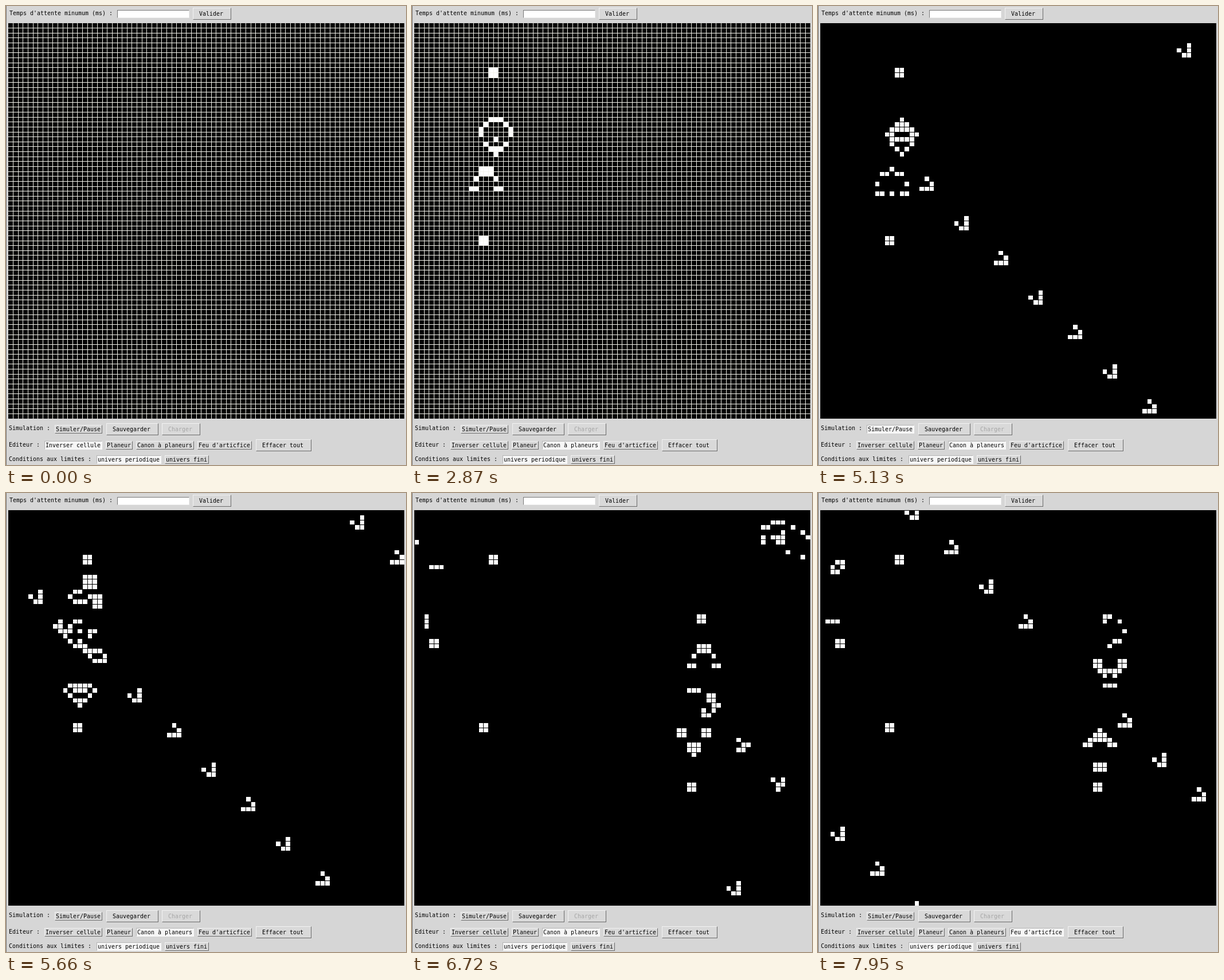
Recreate the animation shown at these times as an HTML page with a canvas. Size 698 px wide and 802 px high, loop 7990 ms.

```html
<!DOCTYPE html>
<html lang="fr">
<head>
<meta charset="utf-8">
<style>
  html, body { margin: 0; width: 698px; height: 802px; overflow: hidden; background: #d6d6d6; }
  body { position: relative; font: 9.97px/12px "DejaVu Sans Mono", "Liberation Mono", monospace; color: #000; }
  body > * { position: absolute; box-sizing: border-box; white-space: pre; }
  canvas { left: 4px; top: 30px; }
  .edge { left: 0; top: 0; width: 1px; height: 802px; background: #777; }
  .entry { background: #fff; border: 1px solid; border-color: #777 #eee #eee #777; }
  .button, .toggle { background: #d9d9d9; border: 1px solid; border-color: #f2f2f2 #6a6a6a #6a6a6a #f2f2f2; }
  .off { color: #a6a6a6; }
  .lit { background: #f6f6f6; border-color: #b4b4b4 #fafafa #fafafa #b4b4b4; }
</style>
</head>
<body>
<div class="edge"></div>
<canvas id="board" width="691" height="691"></canvas>
<script>
const LOOP = 7990, N = 80, SIZE = 691;
const GUN_SHOWN = 2840, RUN = 4500, SECOND_GUN = 403;

// Interface
function box(cls, x, y, w, h, text = '', textX = x) {
  const el = document.createElement('div');
  el.className = cls;
  Object.assign(el.style, {
    left: x + 'px', top: y + 'px', width: w + 'px', height: h + 'px',
    paddingLeft: Math.max(0, textX - x - 1) + 'px', lineHeight: h - 2 + 'px'
  });
  el.textContent = text;
  document.body.append(el);
  return el;
}
const label = (x, y, text) => box('label', x, y, text.length * 6 + 4, 16, text);
const button = (x, y, w, text, cls = '') => box('button ' + cls, x, y, w, 21, text, x + 11);
const toggle = (x, y, w, text) => box('toggle', x, y, w, 15, text, x + 2);

label(6, 6, "Temps d'attente minumum (ms) :");
box('entry', 194, 7, 126, 14);
button(326, 3, 67, 'Valider');

label(5, 731, 'Simulation :');
const simulate = toggle(85, 732, 83, 'Simuler/Pause');
button(175, 729, 91, 'Sauvegarder');
button(272, 729, 67, 'Charger', 'off');

label(5, 760, 'Editeur :');
const invert = toggle(67, 760, 101, 'Inverser cellule');
toggle(174, 760, 47, 'Planeur');
const cannon = toggle(227, 760, 101, 'Canon à planeurs');
const firework = toggle(334, 760, 95, "Feu d'articfice");
button(436, 757, 97, 'Effacer tout');

label(5, 785, 'Conditions aux limites :');
toggle(158, 785, 113, 'univers periodique').classList.add('lit');
toggle(277, 785, 77, 'univers fini');

// Spans of time in which each toggle is bright
const bright = [
  [invert, [0, 1860]],
  [cannon, [1760, 7600]],
  [firework, [3850, 4060], [7480, LOOP]],
  [simulate, [4060, 5600]]
];

// Glider gun: row offset -> column offsets, one digit each
const GUN = {
  0: '45', 1: '45', 10: '456', 11: '37', 12: '28', 13: '28', 14: '5', 15: '37',
  16: '456', 17: '5', 20: '234', 21: '234', 22: '15', 24: '0156', 34: '23', 35: '23'
};
function addGun(cells, row, col) {
  for (const r in GUN)
    for (const c of GUN[r]) cells[(row + +r) * N + col + +c] = 1;
}

// Life on a torus
function evolve(cells) {
  const next = new Uint8Array(N * N);
  for (let r = 0; r < N; r++) {
    const rows = [(r + N - 1) % N * N, r * N, (r + 1) % N * N];
    for (let c = 0; c < N; c++) {
      const left = (c + N - 1) % N, right = (c + 1) % N;
      let sum = 0;
      for (const k of rows) sum += cells[k + left] + cells[k + c] + cells[k + right];
      const i = r * N + c;
      next[i] = sum === 3 || (sum === 4 && cells[i]) ? 1 : 0;
    }
  }
  return next;
}

// Time, generation, screen refreshes until the next entry
const PACE = [
  [RUN, 146, 13], [5130, 239, 25], [6230, 401, 24], [7240, 559, 17], [7950, 664, 1], [LOOP, 670, 1]
];
function generationAt(t) {
  let i = 0;
  while (i < PACE.length - 2 && t >= PACE[i + 1][0]) i++;
  const [t0, g0, n] = PACE[i], [t1, g1] = PACE[i + 1];
  const k = Math.floor((t - t0) / (t1 - t0) * n);
  return g0 + Math.round((g1 - g0) * k / n);
}

const empty = new Uint8Array(N * N);
const history = [empty.slice()];
addGun(history[0], 9, 11);
for (let g = 1; g <= 670; g++) {
  const cells = evolve(history[g - 1]);
  if (g === SECOND_GUN) addGun(cells, 21, 53);
  history.push(cells);
}

// Drawing
const ctx = document.getElementById('board').getContext('2d');
const edge = i => Math.floor(i * SIZE / N);

function drawBoard(cells, grid) {
  ctx.fillStyle = '#000';
  ctx.fillRect(0, 0, SIZE, SIZE);
  ctx.fillStyle = '#fff';
  cells.forEach((on, i) => {
    if (!on) return;
    const r = Math.floor(i / N), c = i % N, x = edge(c), y = edge(r);
    ctx.fillRect(x + 1, y + 1, edge(c + 1) - x - 1, edge(r + 1) - y - 1);
  });
  if (!grid) return;
  ctx.fillStyle = '#f4f4ec';
  for (let i = 1; i < N; i++) {
    ctx.fillRect(edge(i), 0, 1, SIZE);
    ctx.fillRect(0, edge(i), SIZE, 1);
  }
}

let shown;
function render(t) {
  for (const [el, ...spans] of bright)
    el.classList.toggle('lit', spans.some(([from, to]) => t >= from && t < to));
  const running = t >= RUN;
  const g = running ? generationAt(t) : t >= GUN_SHOWN ? 0 : -1;
  if (g === shown) return;
  shown = g;
  drawBoard(g < 0 ? empty : history[g], !running);
}

const start = performance.now();
function tick() {
  render((performance.now() - start) % LOOP);
  requestAnimationFrame(tick);
}
tick();
</script>
</body>
</html>
```
